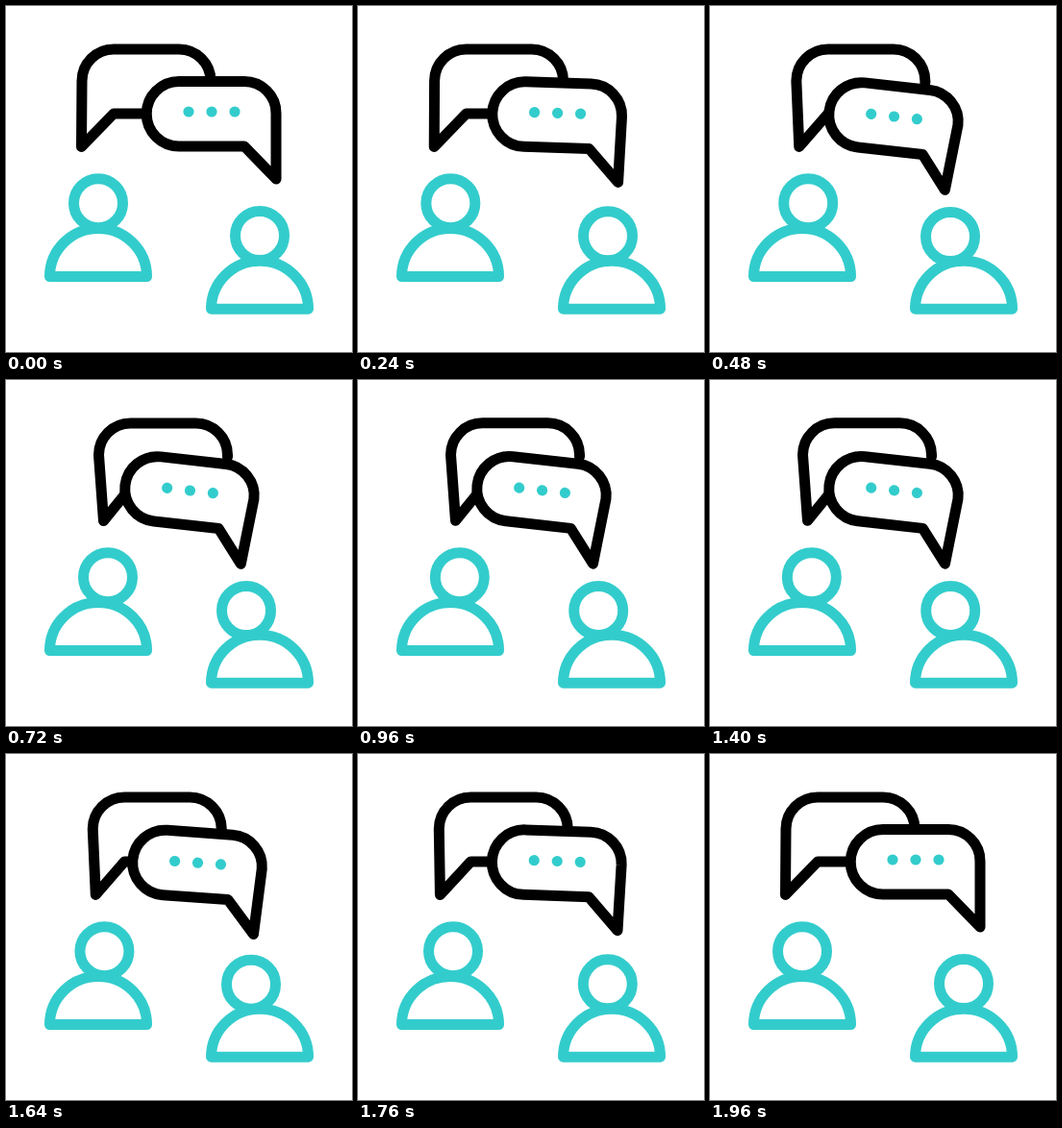
An HTML page for the animation above (2000 ms loop, 360 px wide and 360 px high).

```html
<!DOCTYPE html>
<html lang="en">
<head>
<meta charset="utf-8">
<title>Conversation</title>
<style>
  html, body { margin: 0; width: 100%; height: 100%; overflow: hidden; background: #fff; }
  svg { display: block; width: 100%; height: 100%; }
  .line { fill: none; stroke-width: 11; stroke-linejoin: round; stroke-linecap: round; }
  .teal { stroke: #33cccc; }
  .black { stroke: #000; }
  #front path { fill: #fff; }
  #front circle { fill: #33cccc; }
</style>
</head>
<body>
<svg viewBox="0 0 360 360">
  <path id="back" class="line black"/>
  <g id="front">
    <path id="bubble" class="line black"/>
    <circle cx="190" cy="110" r="5.6"/>
    <circle cx="214" cy="110" r="5.6"/>
    <circle cx="238" cy="110" r="5.6"/>
  </g>
  <g class="line teal">
    <path d="M45.5 281.5a50.5 50 0 0 1 101 0z"/>
    <path d="M213.5 315.2a50.5 50 0 0 1 101 0z"/>
    <circle id="leftHead" r="25.5"/>
    <circle id="rightHead" r="25.5"/>
  </g>
</svg>
<script>
  const LOOP = 2000, STEP = 40;
  const $ = id => document.getElementById(id);
  const set = (id, attrs) => {
    for (const name in attrs) $(id).setAttribute(name, attrs[name]);
  };

  // Sine ease from 0 to 1 between two times
  const ease = (t, from, to) => {
    const u = Math.min(1, Math.max(0, (t - from) / (to - from)));
    return (1 - Math.cos(Math.PI * u)) / 2;
  };

  function draw(t) {
    const away = ease(t, 1420, 1960);
    const left = ease(t, 180, 700) - away;
    const right = ease(t, 100, 490) - away;
    const hop = ease(t, 940, 1180) - ease(t, 1180, 1420);

    set('leftHead', { cx: 96 + 10 * (left - hop), cy: 205.2 });
    set('rightHead', { cx: 264 - 14 * right + 13 * hop, cy: 239 + right - 2 * hop });

    // Each bubble's tail tip swings further than its body
    const backTip = 78.5 + 5.5 * left - 2 * hop;
    set('back', {
      d: `M213 80V78A33 33 0 0 0 180 45H112A33 33 0 0 0 79 78L${backTip} 146.5L112 112H146`,
      transform: `translate(${17.5 * left + 0.7 * hop} ${-7.7 * hop})`
    });

    const frontTip = 281 - 6 * (right - hop);
    set('bubble', {
      d: `M180 78.5H248A33 33 0 0 1 281 111.5L${frontTip} 180L248 146H180A33.75 33.75 0 0 1 180 78.5Z`
    });
    const x = 214 - 22.5 * right + 3.7 * hop;
    const y = 110 + 5 * right - 11.7 * hop;
    set('front', {
      transform: `translate(${x} ${y}) rotate(${6.4 * right}) translate(-214 -110)`
    });
  }

  const start = performance.now();
  function tick() {
    const t = (performance.now() - start) % LOOP;
    draw(Math.floor(t / STEP) * STEP);
    requestAnimationFrame(tick);
  }
  tick();
</script>
</body>
</html>
```
